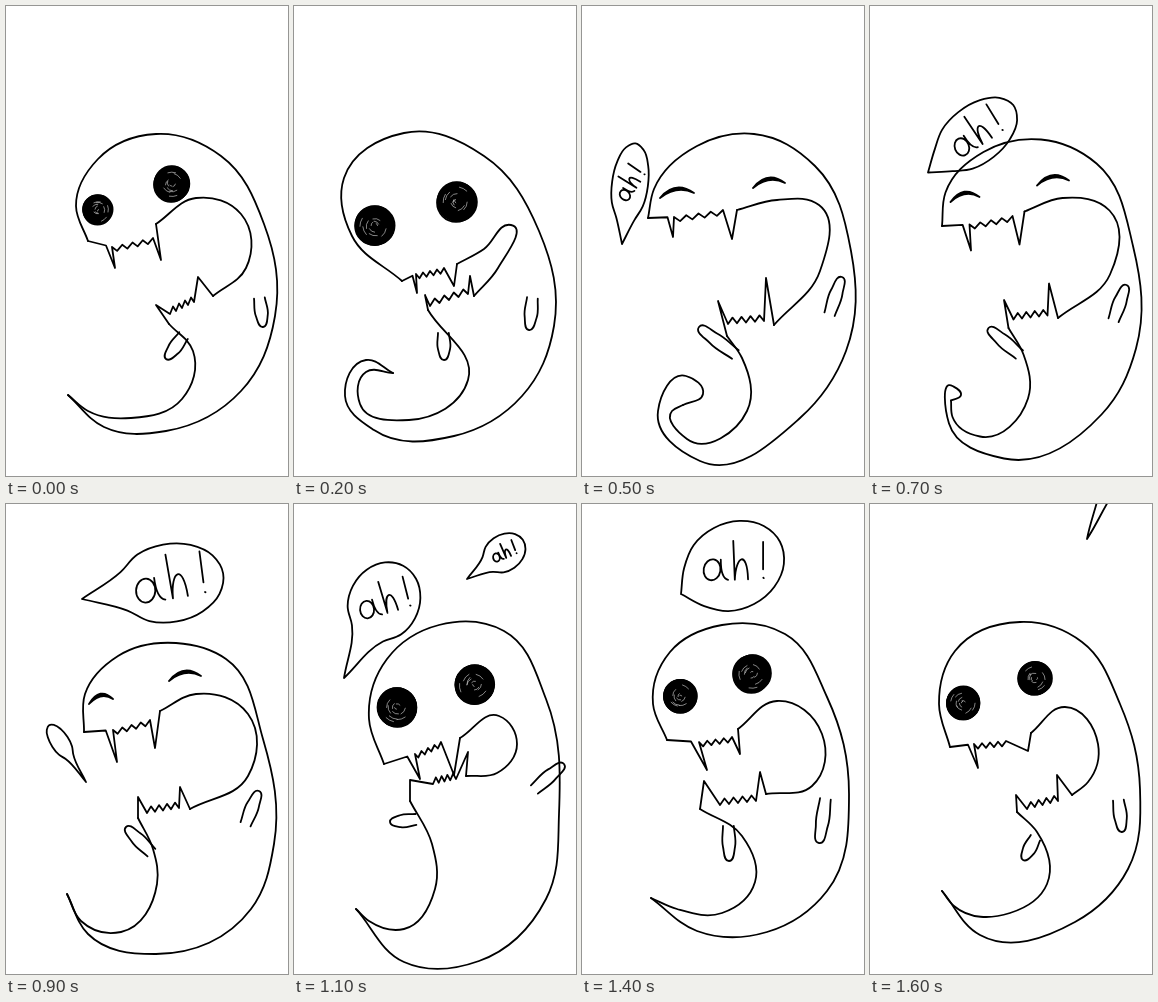
Recreate the animation shown at these times as an HTML page with a canvas. Size 282 by 470 pixels, loop 1.7 s.

```html
<!DOCTYPE html>
<html lang="en">
<head>
<meta charset="utf-8">
<title>Laughing ghost</title>
<style>
html, body { margin: 0; width: 100%; height: 100%; overflow: hidden; background: #fff; }
canvas { display: block; }
</style>
</head>
<body>
<canvas id="stage" width="282" height="470" role="img" aria-label="A ghost laughing: ah!"></canvas>
<script>
const STEP = 100, LOOP = 1700, INK = 1.8;
const ctx = document.getElementById('stage').getContext('2d');

// Key poses; "at" counts steps. The parts share their end points:
// back: snout to tail tip, belly: between tail tip and chin,
// teeth: fang, row start, row end, fang, corner; mouth: corner to jaw hinge,
// jaw: fang, row end, row start, fang, chin; arms: base and tip of each;
// eyes: two centres, then both radii.
const ghost = [
  { at: 0,
    back: '82,235 70,200 92,153 150,128 215,150 258,218 269,310 235,385 160,425 98,421 62,389',
    belly: '82,405 125,412 176,393 187,345',
    teeth: '109,262 106,241 147,232 155,254 150,218',
    mouth: '190,192 235,208 240,262 207,290',
    jaw: '192,271 188,296 164,308 150,299 163,318',
    arms: '178,330 160,353 254,292 257,321',
    eyes: '92,204 166,178 15,18' },
  { at: 2,
    back: '108,275 58,230 50,172 110,127 190,150 245,225 260,320 228,390 160,430 80,424 51,390 72,354 99,367',
    belly: '72,366 66,398 115,414 174,374',
    teeth: '123,287 122,268 150,262 160,280 163,258',
    mouth: '190,243 217,219 204,262 180,290',
    jaw: '176,270 174,288 136,300 131,289 134,304',
    arms: '150,327 150,354 239,292 235,324',
    eyes: '81,220 163,196 20,20' },
  { at: 5, closed: true,
    back: '66,212 72,183 115,140 172,128 233,160 269,245 264,345 218,412 118,455 76,405 104,370 121,388 101,399',
    belly: '90,405 105,433 165,405 160,352',
    teeth: '91,231 92,211 141,204 150,233 155,204',
    mouth: '195,194 237,199 238,265 192,319',
    jaw: '184,272 182,315 146,318 136,295 145,330',
    arms: '153,349 117,321 247,308 260,271',
    eyes: '95,187 187,177 17,16' },
  { at: 9, closed: true,
    back: '78,228 79,190 112,152 170,139 220,155 257,235 268,340 245,405 150,450 82,430 61,390',
    belly: '75,417 115,428 151,380 147,345',
    teeth: '111,258 107,226 144,216 149,244 154,207',
    mouth: '190,190 242,210 242,272 184,305',
    jaw: '174,283 173,304 141,309 132,293 132,314',
    arms: '145,349 120,323 239,320 253,287',
    eyes: '95,195 179,172 12,16' },
  { at: 11,
    back: '90,260 75,215 93,155 145,121 210,127 252,195 265,310 252,395 185,457 110,458 62,405',
    belly: '75,417 110,425 141,385 138,340',
    teeth: '126,275 121,250 147,238 160,271 166,234',
    mouth: '205,212 223,240 203,269 172,272',
    jaw: '174,248 162,275 139,280 116,276 116,297',
    arms: '122,316 96,318 240,285 270,260',
    eyes: '103,203 181,181 20,20' },
  { at: 14,
    back: '85,236 71,200 88,148 140,121 203,130 245,193 267,290 245,387 185,428 115,427 69,394',
    belly: '95,405 140,409 173,378 160,332',
    teeth: '125,266 117,238 150,233 158,250 156,225',
    mouth: '195,197 240,230 230,282 184,290',
    jaw: '178,268 174,297 138,301 122,277 118,305',
    arms: '147,322 147,357 244,295 237,339',
    eyes: '98,192 170,170 17,19' },
  { at: 16,
    back: '80,243 69,200 85,147 150,118 212,138 250,200 270,285 258,365 205,418 110,431 72,387',
    belly: '84,402 140,409 177,380 167,328',
    teeth: '108,264 104,240 136,237 158,247 161,229',
    mouth: '195,203 228,240 218,278 202,291',
    jaw: '187,271 188,297 157,305 146,291 147,308',
    arms: '166,334 153,356 249,296 252,328',
    eyes: '93,199 165,175 17,17' }
];

// Bubbles drift up from the mouth: tip, centre, radii, lettering size and angle.
const bubbles = [
  [
    { at: 4, drop: '66,252 47,212 18,10 0,-1' },
    { at: 5, drop: '40,238 48,178 41,18 11.5,-1' },
    { at: 9, drop: '76,95 164,79 54,39 24,-.16' },
    { at: 11, drop: '173,75 210,49 23,18 8.3,-.4' },
    { at: 12, drop: '193,55 230,29 23,18 8.3,-.4' }
  ], [
    { at: 9, drop: '80,278 54,238 20,9 0,-.8' },
    { at: 11, drop: '50,174 90,98 41,35 17.5,-.28' },
    { at: 14, drop: '99,90 152,62 52,43 21,-.03' },
    { at: 16, drop: '217,35 262,-75 50,30 20,0' }
  ]
];

const lerp = (a, b, k) => a + (b - a) * k;
const mix = (p, q, k) => [lerp(p[0], q[0], k), lerp(p[1], q[1], k)];
const dist = (p, q) => Math.hypot(q[0] - p[0], q[1] - p[1]);
const random = seed => Math.abs(Math.sin(seed * 127.1) * 43758.5) % 1;

for (const key of [...ghost, ...bubbles.flat()])
  for (const name in key)
    if (typeof key[name] === 'string')
      key[name] = key[name].split(' ').map(pair => pair.split(',').map(Number));

// Shorter lists rest on their last point, so a curled tail unrolls into its tip.
function blend(a, b, k) {
  const length = k === 0 ? a.length : k === 1 ? b.length : Math.max(a.length, b.length);
  return Array.from({ length }, (_, i) =>
    mix(a[Math.min(i, a.length - 1)], b[Math.min(i, b.length - 1)], k));
}

function poseAt(keys, step) {
  if (step < keys[0].at || step > keys[keys.length - 1].at) return null;
  const i = Math.max(1, keys.findIndex(key => key.at >= step));
  const a = keys[i - 1], b = keys[i], k = (step - a.at) / (b.at - a.at);
  const pose = { closed: (k < .5 ? a : b).closed };
  for (const name in a)
    if (Array.isArray(a[name])) pose[name] = blend(a[name], b[name], k);
  return pose;
}

function line(pts) {
  ctx.beginPath();
  pts.forEach(p => ctx.lineTo(...p));
  ctx.stroke();
}

// Smooth curve whose tangents follow circles through neighbouring points.
function curve(pts) {
  const last = pts.length - 1;
  const handle = (i, reach) => {
    const p = pts[Math.max(0, i - 1)], q = pts[i], r = pts[Math.min(last, i + 1)];
    const before = dist(p, q) ** 2 || 1, after = dist(q, r) ** 2 || 1;
    const t = [0, 1].map(c => (q[c] - p[c]) / before + (r[c] - q[c]) / after);
    const scale = reach / (Math.hypot(...t) || 1);
    return [q[0] + t[0] * scale, q[1] + t[1] * scale];
  };
  ctx.beginPath();
  ctx.moveTo(...pts[0]);
  for (let i = 0; i < last; i++) {
    const reach = dist(pts[i], pts[i + 1]) * .36;
    ctx.bezierCurveTo(...handle(i, reach), ...handle(i + 1, -reach), ...pts[i + 1]);
  }
  ctx.stroke();
}

// Four small teeth between two points.
function toothRow(from, to, height) {
  return Array.from({ length: 9 }, (_, i) => {
    const [x, y] = mix(from, to, i / 8);
    return [x, y + i % 2 * height];
  });
}

function arm(base, tip) {
  const length = dist(base, tip), width = 6;
  const ux = (tip[0] - base[0]) / length, uy = (tip[1] - base[1]) / length;
  const at = (along, side) =>
    [base[0] + ux * along - uy * side, base[1] + uy * along + ux * side];
  curve([at(0, width), at(length * .6, width), at(length, 0), at(length * .6, -width), at(0, -width * .8)]);
}

function openEye([x, y], r, seed) {
  const ring = (radius, start, sweep, n) => {
    ctx.beginPath();
    ctx.arc(x + random(n) * 2 - 1, y + random(n + 1) * 2 - 1, radius, start, start + sweep);
    ctx.stroke();
  };
  ctx.beginPath();
  ctx.arc(x, y, r - 1, 0, 7);
  ctx.fill();
  for (let i = 0; i < 4; i++) ring(r - 1, 0, 7, seed + i);
  ctx.save();
  ctx.strokeStyle = '#ddd';
  ctx.lineWidth = .6;
  for (let i = 0; i < 10; i++)
    ring(r * (.1 + .07 * i), 6.28 * random(seed + i * 3), 1.3 - i * .08, seed + i);
  ctx.restore();
}

function closedEye([x, y], r) {
  ctx.beginPath();
  ctx.moveTo(x - r, y + 5);
  ctx.quadraticCurveTo(x - r * .1, y - 13, x + r, y);
  ctx.quadraticCurveTo(x, y - 8, x - r, y + 5);
  ctx.fill();
  ctx.stroke();
}

// Hand-lettered "ah!" centred on a point.
function lettering(x, y, size, angle) {
  ctx.save();
  ctx.translate(x, y);
  ctx.rotate(angle);
  ctx.scale(size, size);
  ctx.lineWidth = INK / size;
  ctx.beginPath();
  ctx.ellipse(-1.05, .15, .4, .5, .2, 0, 7);
  ctx.moveTo(-.62, -.32);
  ctx.quadraticCurveTo(-.65, .55, -.3, .65);
  ctx.moveTo(0, -1.2);
  ctx.lineTo(.02, .65);
  ctx.bezierCurveTo(.1, -.5, .65, -.75, .65, .65);
  ctx.moveTo(1.42, -1.1);
  ctx.lineTo(1.38, .2);
  ctx.moveTo(1.38, .6);
  ctx.lineTo(1.4, .62);
  ctx.stroke();
  ctx.restore();
}

function drawBubble([tip, [x, y], [long, wide], [size, angle]]) {
  const axis = Math.atan2(y - tip[1], x - tip[0]), cos = Math.cos(axis), sin = Math.sin(axis);
  const outline = [tip];
  for (let i = -5; i <= 5; i++) {
    const u = long * Math.cos(i * Math.PI / 6), v = wide * Math.sin(i * Math.PI / 6);
    outline.push([x + u * cos - v * sin, y + u * sin + v * cos]);
  }
  curve([...outline, tip]);
  if (size > 0) lettering(x, y, size, angle);
}

function drawGhost({ back, belly, teeth, mouth, jaw, arms, eyes, closed }, step) {
  const snout = back[0], tail = back[back.length - 1];
  const [fang, rowStart, rowEnd, backFang, corner] = teeth;
  const [jawFang, jawEnd, jawStart, frontFang, chin] = jaw;
  curve(back);
  curve([tail, ...belly, chin]);
  line([snout, mix(snout, rowStart, .75), fang, ...toothRow(rowStart, rowEnd, 5), backFang, corner]);
  curve([corner, ...mouth]);
  line([mouth[mouth.length - 1], jawFang, ...toothRow(jawEnd, jawStart, -6), frontFang, chin]);
  arm(arms[0], arms[1]);
  arm(arms[2], arms[3]);
  const eye = closed ? closedEye : openEye;
  eye(eyes[0], eyes[2][0], step);
  eye(eyes[1], eyes[2][1], step + 20);
}

function draw(step) {
  ctx.fillStyle = '#fff';
  ctx.fillRect(0, 0, 282, 470);
  ctx.fillStyle = ctx.strokeStyle = '#000';
  ctx.lineCap = ctx.lineJoin = 'round';
  ctx.lineWidth = INK;
  drawGhost(poseAt(ghost, step), step);
  for (const keys of bubbles) {
    const bubble = poseAt(keys, step);
    if (bubble) drawBubble(bubble.drop);
  }
}

const begin = performance.now();
function tick() {
  draw(Math.floor((performance.now() - begin) % LOOP / STEP));
  requestAnimationFrame(tick);
}
tick();
</script>
</body>
</html>
```
